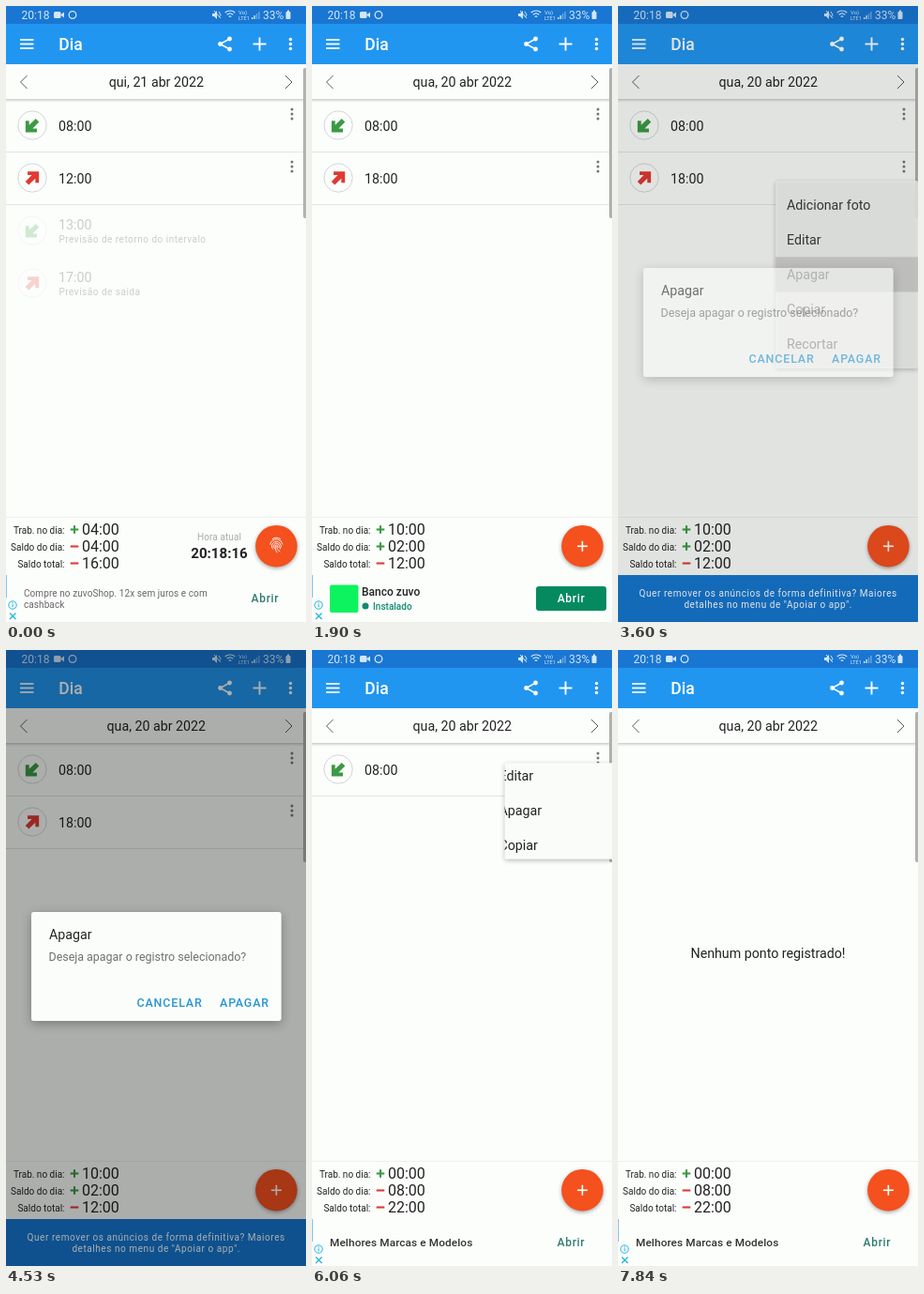
Animation of 320x656 px, one loop 8610 ms. Source, as an HTML page with a canvas:

```html
<!DOCTYPE html>
<html lang="pt-BR">
<head>
<meta charset="utf-8">
<title>Registro de ponto</title>
<style>
html, body { margin: 0; width: 100%; height: 100%; overflow: hidden; background: #fcfefc; }
canvas { display: block; width: 320px; height: 656px; }
</style>
</head>
<body>
<canvas id="stage"></canvas>
<script>
const LOOP = 8610;
const PAPER = '#fcfefc', INK = '#222', GREEN = '#3c9a45', RED = '#e03a33', ORANGE = '#f4511e';
const BODY = 14.22, SMALL = 12.44;
const canvas = document.getElementById('stage');
const c = canvas.getContext('2d');
const dpr = window.devicePixelRatio || 1;
canvas.width = 320 * dpr;
canvas.height = 656 * dpr;

const mix = (a, b, k) => a + (b - a) * k;
const progress = (t, from, to) => Math.min(1, Math.max(0, (t - from) / (to - from)));
const smooth = k => k * k * (3 - 2 * k);
const slowDown = (k, power) => 1 - (1 - k) ** power;

// Each visit opens a row menu, picks "Apagar" and confirms it.
const visits = [
  { menu: 2480, press: 3500, dialog: 3500, close: 4530, closed: 4660, top: 186,
    notice: ['Quer remover os anúncios de forma definitiva? Maiores', 'detalhes no menu de "Apoiar o app".'] },
  { menu: 5960, press: 6660, dialog: 6830, close: 7640, closed: 7840, top: 130,
    notice: ['A exibição dos anúncios ajudam a manter o Turno Zuvel', 'gratuito para você! Obrigado pela compreensão.'] }
];
for (const v of visits) v.removed = (v.close + v.closed) / 2;

function layer(alpha, draw) {
  if (alpha <= 0) return;
  c.save();
  c.globalAlpha *= alpha;
  draw();
  c.restore();
}

function text(str, x, y, { size = BODY, fill = INK, weight = 400, gap = 0, align = 'left' } = {}) {
  c.font = `${weight} ${size}px Roboto, sans-serif`;
  c.letterSpacing = gap + 'px';
  c.textAlign = align;
  c.fillStyle = fill;
  c.fillText(str, x, y);
}

function box(x, y, w, h, fill, radius = 0) {
  c.fillStyle = fill;
  c.beginPath();
  c.roundRect(x, y, w, h, radius);
  c.fill();
}

function disc(x, y, r, fill) {
  c.fillStyle = fill;
  c.beginPath();
  c.arc(x, y, r, 0, 7);
  c.fill();
}

function ring(x, y, r, color, width, from = 0, to = 2 * Math.PI) {
  c.strokeStyle = color;
  c.lineWidth = width;
  c.beginPath();
  c.arc(x, y, r, from, to);
  c.stroke();
}

function line(points, color, width) {
  c.strokeStyle = color;
  c.lineWidth = width;
  c.beginPath();
  points.forEach(p => c.lineTo(...p));
  c.stroke();
}

function polygon(points, fill) {
  c.fillStyle = fill;
  c.beginPath();
  points.forEach(p => c.lineTo(...p));
  c.fill();
}

function sign(x, y, half, color, width, plus = true) {
  line([[x - half, y], [x + half, y]], color, width);
  if (plus) line([[x, y - half], [x, y + half]], color, width);
}

function raised(alpha, blur, dy, draw) {
  c.save();
  c.shadowColor = `rgba(0,0,0,${alpha})`;
  c.shadowBlur = blur * dpr;
  c.shadowOffsetY = dy * dpr;
  draw();
  c.restore();
}

function statusBar() {
  const light = '#d3e6f8';
  box(0, 0, 320, 19, '#1976d2');
  text('20:18', 16.5, 14, { size: 12, fill: light });
  box(51, 6, 7.5, 7, light, 1.5);
  polygon([[58, 9.5], [62, 6.5], [62, 12.5]], light);
  ring(71, 9.5, 3.8, light, 1.3);
  polygon([[220, 8], [222, 8], [225, 5], [225, 14], [222, 11], [220, 11]], light);
  line([[222, 5], [229, 13]], light, 1);
  line([[227, 6], [229, 9.5], [227, 12]], light, 1);
  for (const r of [2, 5, 8]) ring(239, 13, r, light, 1.2, -2.3, -0.85);
  text('Vo)', 248, 9, { size: 6, fill: light });
  text('LTE1', 248, 14.5, { size: 5.5, fill: light });
  for (let i = 0; i < 4; i++) box(262 + i * 2.4, 12 - i * 2, 1.4, 2 + i * 2, i < 2 ? light : '#6ea9e2');
  text('33%', 274, 14, { size: 12, fill: light });
  box(298.5, 6, 5, 8, light, 1);
  box(300, 4.5, 2, 2, light);
}

function toolbar() {
  box(0, 19, 320, 43, '#2196f0');
  for (const y of [36, 40.5, 45]) line([[15, y], [29.5, y]], '#fff', 1.7);
  text('Dia', 56.3, 47, { size: 17.5, fill: '#fff', weight: 500 });
  line([[238.5, 35], [228.5, 40.5], [238.5, 46]], '#fff', 1.5);
  for (const p of [[238.5, 35], [228.5, 40.5], [238.5, 46]]) disc(...p, 2.4, '#fff');
  sign(270.5, 40.5, 7, '#fff', 1.9);
  for (const y of [35.5, 40.5, 45.5]) disc(303.5, y, 1.7, '#fff');
}

function dateBar(label) {
  raised(0.28, 3, 1, () => box(-5, 62, 330, 37, PAPER));
  text(label, 160.3, 86, { align: 'center' });
  line([[22.5, 74], [15.5, 81], [22.5, 88]], '#444', 0.9);
  line([[298, 74], [305, 81], [298, 88]], '#444', 0.9);
}

function badge(y, leaving) {
  ring(28, y, 15.2, '#d4d6d4', 1);
  c.save();
  c.translate(28, y + 0.3);
  c.scale(1.1, 1.1);
  if (leaving) c.rotate(Math.PI);
  polygon([[-6.5, 6.5], [-6.5, -4.5], [-3, -4.5], [-3, -0.4], [3.4, -6.6], [6.6, -3.4],
    [0.4, 3], [4.5, 3], [4.5, 6.5]], leaving ? RED : GREEN);
  c.restore();
}

function row(index, time, leaving) {
  const y = 127 + index * 56;
  badge(y, leaving);
  text(time, 56, y + 6);
  for (const d of [-17, -12, -7]) disc(305, y + d, 1.5, '#777');
  box(0, y + 28, 320, 1, '#e2e4e2');
}

function forecast(index, time, note) {
  const y = 127 + index * 56;
  layer(0.22, () => {
    badge(y, index === 3);
    text(time, 56, y - 1);
    text(note, 56.5, y + 13, { size: 10, gap: 0.5 });
  });
}

function firstDay() {
  row(0, '08:00', false);
  row(1, '12:00', true);
  forecast(2, '13:00', 'Previsão de retorno do intervalo');
  forecast(3, '17:00', 'Previsão de saida');
}

function secondDay(t) {
  if (t < visits[1].removed) row(0, '08:00', false);
  else text('Nenhum ponto registrado!', 160, 328, { align: 'center' });
  if (t < visits[0].removed) row(1, '18:00', true);
}

function list(t) {
  const shift = 320 * smooth(progress(t, 550, 1390));
  c.save();
  c.beginPath();
  c.rect(0, 101, 320, 443);
  c.clip();
  c.translate(shift, 0);
  if (shift < 320) firstDay();
  c.translate(-320, 0);
  if (shift > 0) secondDay(t);
  c.restore();
}

function totals(values) {
  box(0, 544, 320, 112, PAPER);
  box(0, 544, 320, 1, '#eef0ee');
  ['Trab. no dia:', 'Saldo do dia:', 'Saldo total:'].forEach((label, i) => {
    const y = 557.5 + i * 18, plus = values[i][0] === '+';
    text(label, 62.5, y + 4, { size: 10, align: 'right' });
    sign(73, y, 4.3, plus ? GREEN : RED, 2.1, plus);
    text(values[i].slice(1), 81, y + 5.8, { size: 16 });
  });
}

function fingerprint(x, y) {
  ring(x, y, 1.2, '#fff', 0.9, 2.6, 6.8);
  ring(x, y, 3, '#fff', 0.9, 2.2, 6.9);
  ring(x, y, 4.9, '#fff', 0.9, 2.4, 7);
  ring(x, y - 0.5, 6.8, '#fff', 0.9, 3.3, 6.1);
  ring(x, y - 2, 7, '#fff', 0.9, 4, 5.4);
  line([[x + 0.5, y], [x + 1, y + 3.5], [x + 4, y + 6]], '#fff', 0.9);
  line([[x - 1.3, y], [x - 1, y + 4], [x + 1, y + 7]], '#fff', 0.9);
}

function actionButton(t) {
  const swap = progress(t, 1490, 1720);
  layer(1 - swap, () => {
    const second = 16 + Math.floor((t + 900) / 1000);
    text('Hora atual', 227.5, 569, { size: 10, fill: '#aaa', gap: 0.1, align: 'center' });
    text('20:18:' + second, 227.5, 588, { size: 15.1, weight: 700, align: 'center' });
  });
  raised(0.35, 4, 1.5, () => disc(288.4, 575.2, 22.3, ORANGE));
  layer(1 - swap, () => fingerprint(288.4, 575.2));
  layer(swap, () => sign(288.4, 575.3, 5.5, '#fff', 1.6));
}

const adLink = () => text('Abrir', 261.5, 635, { size: 12, fill: '#2f7d70', weight: 500, gap: 0.7 });

const ads = [
  () => {
    text('Compre no zuvoShop. 12x sem juros e com', 19, 628.5, { size: 10, fill: '#666', gap: 0.08 });
    text('cashback', 19, 640.5, { size: 10, fill: '#666', gap: 0.08 });
    adLink();
  },
  () => {
    box(19, 616.5, 30.5, 29.5, '#0cf35f', 2);
    text('Banco zuvo', 53, 628, { size: 12, weight: 500 });
    disc(57, 639, 3.5, '#128a70');
    text('Instalado', 65, 642.5, { size: 10, fill: '#128a70', weight: 500 });
    box(239, 618, 75, 26, '#058a60', 3);
    text('Abrir', 276.5, 635.3, { size: 12, fill: '#fff', weight: 500, gap: 0.7, align: 'center' });
  },
  () => {
    text('Melhores Marcas e Modelos', 19, 635, { size: 11.8, fill: '#333', weight: 500, gap: 0.1 });
    adLink();
  }
];

function banner(t) {
  const visit = visits.find(v => t >= v.dialog && t < v.removed);
  if (visit) {
    box(0, 606, 320, 50, '#1577cf');
    visit.notice.forEach((str, i) =>
      text(str, 160.2, 629.3 + i * 11.8, { size: 10, fill: '#fff', gap: 0.56, align: 'center' }));
    return;
  }
  const second = progress(t, 1490, 1720), third = progress(t, 5560, 5860);
  layer(1 - second, ads[0]);
  layer(second * (1 - third), ads[1]);
  layer(third, ads[2]);
  box(0, 606, 1, 24, '#86c4ee');
  ring(7, 638, 4.2, '#1fb3e0', 1);
  box(6.5, 637.3, 1.1, 3, '#1fb3e0');
  box(6.5, 635.3, 1.1, 1.1, '#1fb3e0');
  line([[4, 646.5], [10.5, 653]], '#1fb3e0', 1.3);
  line([[10.5, 646.5], [4, 653]], '#1fb3e0', 1.3);
}

// The menu grows from the row's dots; its width runs ahead of its height.
function menu(top, k, pressed) {
  const kx = slowDown(k, 3.5), ky = slowDown(k, 1.75);
  const x = mix(326, 244, kx), y = mix(top - 20, top + 100, ky);
  const w = 152 * kx, h = 200 * ky;
  const area = [x - w / 2, y - h / 2, w, h];
  raised(0.27, 5, 1.5, () => box(...area, '#fafcf9', 2));
  c.save();
  c.beginPath();
  c.rect(...area);
  c.clip();
  c.translate(x - 244, y - top - 100);
  if (pressed) box(168, top + 81.2, 152, 37.2, 'rgba(0,0,0,.15)');
  ['Adicionar foto', 'Editar', 'Apagar', 'Copiar', 'Recortar'].forEach((item, i) =>
    text(item, 180, top + 30.7 + i * 37.1));
  c.restore();
}

function dialog() {
  const area = [27, 279, 266.5, 116];
  // Keep the shadow outside, so that it does not darken a half-faded dialog.
  c.save();
  c.beginPath();
  c.rect(0, 0, 320, 656);
  c.roundRect(...area, 3);
  c.clip('evenodd');
  raised(0.3, 11, 3, () => box(...area, PAPER, 3));
  c.restore();
  box(...area, PAPER, 3);
  text('Apagar', 46, 308);
  text('Deseja apagar o registro selecionado?', 45.5, 331, { size: SMALL, fill: '#6d6f6d' });
  const button = { size: SMALL, fill: '#2695d3', weight: 500, gap: 0.85 };
  text('CANCELAR', 139.5, 380, button);
  text('APAGAR', 228, 380, button);
}

function overlay(t, v) {
  if (t < v.menu || t >= v.closed) return;
  const opening = progress(t, v.menu, v.menu + 300);
  const leaving = progress(t, v.dialog, v.dialog + 300);
  const shown = 1 - progress(t, v.close, v.closed);
  layer(Math.min(1, opening * 5) * (1 - leaving ** 2), () => menu(v.top, opening, t >= v.press));
  box(0, 0, 320, 656, `rgba(0,0,0,${0.32 * leaving * shown})`);
  layer(slowDown(progress(t, v.dialog, v.dialog + 230), 1.7) * shown, dialog);
}

function draw(now) {
  const t = now % LOOP;
  const firstShown = t < 970;
  c.setTransform(dpr, 0, 0, dpr, 0, 0);
  box(0, 0, 320, 656, PAPER);
  list(t);
  dateBar(firstShown ? 'qui, 21 abr 2022' : 'qua, 20 abr 2022');
  box(317, 66, 5, 160, '#b0b2b0', 2);
  toolbar();
  statusBar();
  totals(firstShown ? ['+04:00', '-04:00', '-16:00']
    : t < visits[0].removed ? ['+10:00', '+02:00', '-12:00']
    : ['+00:00', '-08:00', '-22:00']);
  actionButton(t);
  banner(t);
  for (const v of visits) overlay(t, v);
}

const start = performance.now();
function tick() {
  draw(performance.now() - start);
  requestAnimationFrame(tick);
}
tick();
</script>
</body>
</html>
```
